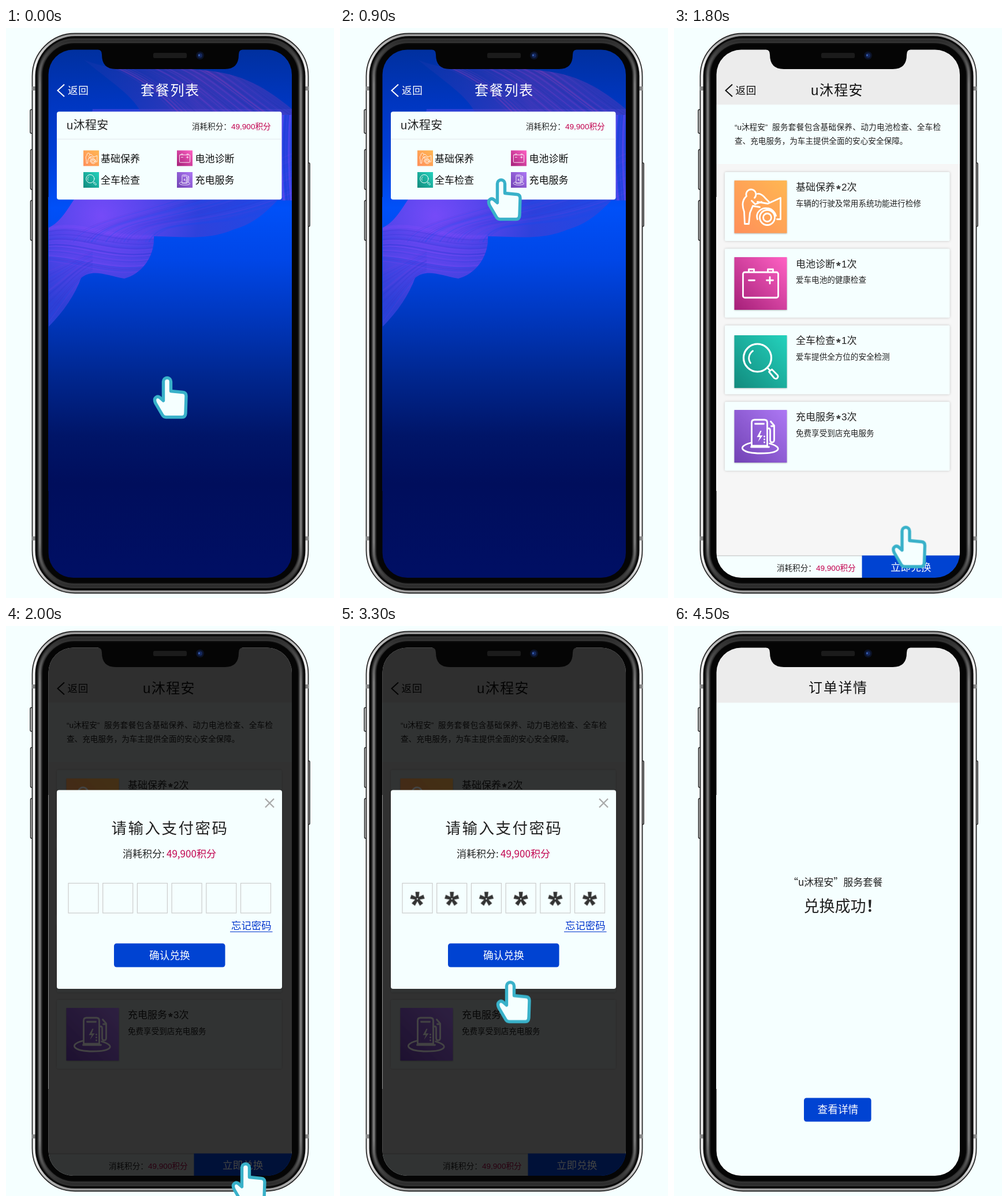
These frames come from a looping animation (568 px wide and 985 px high, 6000 ms). An HTML page:

```html
<!DOCTYPE html>
<html lang="zh-CN">
<head>
<meta charset="utf-8">
<title>套餐兑换</title>
<style>
html,body{margin:0;width:100%;height:100%;overflow:hidden;background:#f5ffff}
svg{display:block;width:568px;height:985px}
text{font-family:'Noto Sans CJK SC','Noto Sans CJK',sans-serif;fill:#222;white-space:pre}
.a{font-family:'Liberation Sans','Noto Sans CJK SC','Noto Sans CJK',sans-serif}
.w{fill:#fff}.k{fill:#111}.r{fill:#c2004e}.b{fill:#0034cc}
.s13{font-size:13.55px}.s17{font-size:17px}
.h{font-size:24px;letter-spacing:1.4px}
.back{font-size:17.5px;letter-spacing:.7px}
.paper{fill:#f5ffff}.blue{fill:#0043d2}
.line{fill:none;stroke:#fff;stroke-width:2.8;stroke-linecap:round;stroke-linejoin:round}
.box{fill:none;stroke:#ccc;stroke-width:1.2}
.pick{fill:none;stroke:#dcdfe4;stroke-width:1.2}
.card{fill:#f5ffff;filter:drop-shadow(0 0 2px #0003)}
.x{fill:none;stroke:#a8a8a8;stroke-width:2.2}
#list,#detail,#ask,#shop,#dim,#done{animation:6s step-end infinite}
#list{animation-name:list}#detail{animation-name:detail}#dim{animation-name:dim}
#ask{animation-name:ask}#shop{animation-name:shop}#done{animation-name:done}
@keyframes list{0%{opacity:1}16.66%,100%{opacity:0}}
@keyframes detail{0%{opacity:0}16.66%{opacity:1}74.99%,100%{opacity:0}}
@keyframes dim{0%{opacity:0}33.33%{opacity:1}74.99%,100%{opacity:0}}
@keyframes ask{0%{opacity:0}33.33%{opacity:1}58.33%,100%{opacity:0}}
@keyframes shop{0%{opacity:0}58.33%{opacity:1}74.99%,100%{opacity:0}}
@keyframes done{0%{opacity:0}74.99%,100%{opacity:1}}
.star{animation:star 6s step-end infinite;animation-delay:calc(var(--i)*100ms - 3901ms)}
@keyframes star{0%{opacity:1}40%,100%{opacity:0}}
#hand{animation:hand 6s infinite}
@keyframes hand{
0%{transform:translate(255px,602px);opacity:1;animation-timing-function:steps(9,end)}
14.99%{transform:translate(255px,260px);animation-timing-function:steps(10,end)}
31.66%{transform:translate(391px,927px)}
41.66%{transform:translate(391px,927px);animation-timing-function:steps(9,end)}
56.66%{transform:translate(256px,574px)}
58.33%{transform:translate(256px,574px);opacity:1;animation-timing-function:steps(9,end)}
73.33%{transform:translate(283px,610px);opacity:1;animation-timing-function:step-end}
74.99%,100%{transform:translate(283px,610px);opacity:0}
}
</style>
</head>
<body>
<svg viewBox="0 0 568 985">
<defs>
<linearGradient id="sky" x2="0" y2="1">
<stop offset="0" stop-color="#00309f"/><stop offset=".1" stop-color="#0036c0"/><stop offset=".2" stop-color="#003ed6"/>
<stop offset=".3" stop-color="#0050f8"/><stop offset=".4" stop-color="#0046e6"/><stop offset=".5" stop-color="#0038c0"/>
<stop offset=".62" stop-color="#00268e"/><stop offset=".73" stop-color="#001568"/><stop offset=".82" stop-color="#000e5c"/><stop offset="1" stop-color="#000f64"/>
</linearGradient>
<radialGradient id="paint" gradientUnits="userSpaceOnUse" cx="165" cy="325" r="280">
<stop offset="0" stop-color="#8a4af8"/><stop offset=".3" stop-color="#6444ea"/><stop offset=".6" stop-color="#3640d8"/><stop offset="1" stop-color="#2846e0"/>
</radialGradient>
<linearGradient id="haze" x2="1"><stop offset="0" stop-color="#2038b0" stop-opacity=".4"/><stop offset=".55" stop-color="#5c38b4"/><stop offset="1" stop-color="#4038b8"/></linearGradient>
<linearGradient id="orange" x1="1" x2="0" y2="1"><stop stop-color="#ffb752"/><stop offset="1" stop-color="#ff8f5a"/></linearGradient>
<linearGradient id="pink" x1="1" x2="0" y2="1"><stop stop-color="#ff62c4"/><stop offset="1" stop-color="#a41f78"/></linearGradient>
<linearGradient id="teal" x1="1" x2="0" y2="1"><stop stop-color="#24d2bd"/><stop offset="1" stop-color="#128a7d"/></linearGradient>
<linearGradient id="violet" x1="1" x2="0" y2="1"><stop stop-color="#ad78f4"/><stop offset="1" stop-color="#7142b4"/></linearGradient>
<linearGradient id="metal" x2="0" y2="1"><stop stop-color="#999"/><stop offset=".06" stop-color="#f4f4f4"/><stop offset=".94" stop-color="#f0f0f0"/><stop offset="1" stop-color="#999"/></linearGradient>
<linearGradient id="rail" x2="0" y2="1"><stop stop-color="#2c2c2c"/><stop offset=".08" stop-color="#777"/><stop offset=".92" stop-color="#777"/><stop offset="1" stop-color="#2c2c2c"/></linearGradient>
<clipPath id="screen"><rect x="73.500" y="37.500" width="421.500" height="912.500" rx="43"/></clipPath>
<clipPath id="swash"><path d="M74 345C95 335 105 315 122 290L150 140H495V298H470C450 318 430 338 395 348C350 368 300 360 256 360C258 395 235 425 205 433C175 428 150 415 130 432C120 460 100 490 74 516Z"/></clipPath>
<clipPath id="smear"><path d="M135 55C200 82 260 62 330 72C400 76 440 95 495 140V150H235C225 120 180 92 135 55Z"/></clipPath>
<g id="repair"><rect width="91" height="91" fill="url(#orange)"/>
<path class="line" d="M21 27a8.500 8.500 0 1 1 14 3M20 28C12 36 14 46 17 54L18 75H25L27 56L32 44L44 46M30 35L36 41L47 37M40 23C45 22 50 26 54 31L60 37M40 37L58 40L80 30V67H74M40 67C36 55 47 47 56 48C64 48 70 54 72 61"/>
<circle class="line" cx="57" cy="64" r="13"/><circle class="line" cx="57" cy="64" r="7"/></g>
<g id="battery"><rect width="91" height="91" fill="url(#pink)"/>
<rect class="line" x="15" y="26" width="61" height="44" rx="3"/>
<path class="line" d="M25 25V21H34V25M58 25V21H67V25M25 40H35M56 40H67M61.500 34.500V45.500"/></g>
<g id="search"><rect width="91" height="91" fill="url(#teal)"/>
<circle class="line" cx="40" cy="39" r="24" style="stroke-width:3.2"/><path class="line" d="M28 48C23 41 25 32 32 27M58 57L62 61M60 63L65 59L75 69C77 73 73 77 69 74Z"/></g>
<g id="charge"><rect width="91" height="91" fill="url(#violet)"/>
<path class="line" d="M30 62V22Q30 17 35 17H52Q57 17 57 22V62ZM36 24H51M57 32H60Q62 32 62 36V52Q62 56 65 56Q69 56 69 52V27L63 20M64 28H69M28 57C2 64 14 75 46 75C78 75 86 65 61 58M29 64H60"/>
<path d="M45 36L39 47H44L41 55L49 44H44L47 36Z" fill="#fff"/><path class="line" d="M52 46V58" stroke-dasharray="0 5"/></g>
<path id="ast" d="M-2-1L-3.200-11H3.200L2-1Z"/>
<g id="mark"><use href="#ast"/><use href="#ast" transform="rotate(72)"/><use href="#ast" transform="rotate(144)"/><use href="#ast" transform="rotate(216)"/><use href="#ast" transform="rotate(288)"/></g>
<path id="chev" d="M101 97.500L89.500 108L101 118.500" fill="none" stroke-width="2"/>
<path id="down" d="M431 353L438.500 360.500L446 353" fill="none" stroke="#aaa" stroke-width="1.4"/>
<path id="cross" class="x" d="M449 298.500L464 313.500M464 298.500L449 313.500"/>
</defs>

<!-- phone body -->
<g fill="#d8d8d8" stroke="#222" stroke-width="1.500">
<rect x="42" y="141" width="7" height="41" rx="2"/><rect x="42.500" y="210" width="7" height="69" rx="2"/><rect x="42.500" y="298" width="7" height="69" rx="2"/><rect x="519" y="233" width="7" height="110" rx="2"/>
</g>
<rect x="45.500" y="9.500" width="478" height="967" rx="74" fill="url(#metal)" stroke="#2a2a2a" stroke-width="1.800"/>
<path d="M45 104.500H51M518 104.500H524M45 882H51M518 882H524" stroke="#888" stroke-width="7"/>
<rect x="50.500" y="14" width="468" height="958" rx="69" fill="#0c0c0c"/>
<rect x="58.500" y="22" width="452" height="942" rx="60" fill="none" stroke="#333" stroke-width="8"/>
<rect x="58.500" y="22" width="452" height="942" rx="60" fill="none" stroke="url(#rail)" stroke-width="4"/>
<rect x="64" y="28" width="441" height="930" rx="53" fill="#050505"/>

<g clip-path="url(#screen)">
<g id="list">
<rect x="73" y="37" width="423" height="914" fill="url(#sky)"/>
<g clip-path="url(#swash)" fill="none"><rect x="73" y="130" width="423" height="400" fill="url(#paint)" opacity=".85"/><g id="strokes"></g></g>
<g clip-path="url(#smear)" fill="none"><rect x="130" y="50" width="366" height="100" fill="url(#haze)" opacity=".6"/><g id="streaks"></g></g>
<use href="#chev" stroke="#fff"/><text class="w back" x="107" y="114">返回</text>
<text class="w h" x="233" y="116" style="letter-spacing:1.7px">套餐列表</text>
<rect class="paper" x="88" y="144.500" width="389.500" height="152" rx="4"/>
<path d="M88 192H477.500" stroke="#e2e6ec"/>
<text class="a" x="105" y="175" font-size="20" letter-spacing=".4">u沐程安</text>
<text class="a s13" x="322" y="175">消耗积分：</text><text class="a s13 r" x="390" y="175">49,900积分</text>
<use href="#repair" transform="translate(134 211.500)scale(.297)"/><use href="#battery" transform="translate(296 211.500)scale(.297)"/>
<use href="#search" transform="translate(134 249)scale(.297)"/><use href="#charge" transform="translate(296 249)scale(.297)"/>
<g class="s17"><text class="k" x="164" y="232">基础保养</text><text class="k" x="327.500" y="232">电池诊断</text><text class="k" x="164" y="269">全车检查</text><text class="k" x="327.500" y="269">充电服务</text></g>
</g>

<g id="detail">
<rect x="73" y="37" width="423" height="914" fill="#f6f6f6"/>
<rect x="73" y="37" width="423" height="95.500" fill="#ececec"/><rect class="paper" x="73" y="132.500" width="423" height="102.500"/>
<use href="#chev" stroke="#111"/><text class="k back" x="106.500" y="113.500">返回</text>
<text class="a k h" x="237" y="115.500">u沐程安</text>
<text class="a s13" x="105" y="176">“u沐程安”</text><text class="s13" x="170" y="176" letter-spacing=".38">服务套餐包含基础保养、动力电池检查、全车检</text>
<text class="s13" x="105" y="200" letter-spacing=".06">查、充电服务，为车主提供全面的安心安全保障。</text>
<g id="cards"></g>
<rect class="paper" x="73" y="912" width="253" height="39"/><path d="M73 912H326" stroke="#bbb"/>
<text class="a s13" x="178" y="938">消耗积分：</text><text class="a s13 r" x="246" y="938">49,900积分</text>
<g id="buy"><rect class="blue" x="325.500" y="911.500" width="170" height="39"/><text class="w" x="375" y="938" font-size="17.600">立即兑换</text></g>
</g>

<g id="dim">
<rect x="73" y="37" width="423" height="914" opacity=".8"/>
<g opacity=".08"><use href="#repair" x="104.500" y="263.500"/><use href="#charge" x="104.500" y="660"/><use href="#buy"/></g>
</g>

<g id="ask">
<rect class="paper" x="88" y="283.500" width="390" height="343.500" rx="4"/><use href="#cross"/>
<text x="182.500" y="359" font-size="26.500" letter-spacing="2.500">请输入支付密码</text>
<text class="s17" x="202" y="399.500">消耗积分:</text><text class="s17 r" x="278" y="399.500">49,900积分</text>
<g id="cells"></g>
<text class="b" x="390" y="524" font-size="17.400">忘记密码</text><path d="M388 528.500H461.500" stroke="#0034cc"/>
<rect class="blue" x="187" y="548.500" width="192.500" height="41" rx="4.500"/><text class="w" x="248" y="575.500" font-size="17.700">确认兑换</text>
</g>

<g id="shop">
<rect class="paper" x="88" y="284" width="390" height="343.500" rx="4"/><use href="#cross"/>
<g font-size="16.700"><text x="108" y="363.500">省</text><text x="154" y="363.500">份</text><text x="108" y="425.500">城</text><text x="154" y="425.500">市</text><text x="108" y="487.500">特</text><text x="131" y="487.500">约</text><text x="153.500" y="487.500">店</text>
<text x="198" y="363.500">某某省</text><text x="198" y="425.500">某某市</text><text x="198" y="487.500">某某特约店</text></g>
<rect class="pick" x="186.500" y="336.500" width="271.500" height="39.500"/><rect class="pick" x="186.500" y="399" width="271.500" height="39"/><rect class="pick" x="186.500" y="461" width="271.500" height="39"/>
<use href="#down"/><use href="#down" y="62"/><use href="#down" y="124.500"/>
<text class="b" x="362" y="521" font-size="13.900">请选择省份信息</text>
<rect class="blue" x="187" y="542" width="192.500" height="41" rx="4.500"/><text class="w" x="266" y="569" font-size="17.300">确定</text>
<text class="a s13" x="137.500" y="608.500">“u沐程安”</text><text x="202" y="608.500" font-size="13.850">服务套餐只能在选定的特约店核销使用</text>
</g>

<g id="done">
<rect class="paper" x="73" y="37" width="423" height="914"/><rect x="73" y="37" width="423" height="95.500" fill="#ececec"/>
<text class="k h" x="233" y="115" style="letter-spacing:1.7px">订单详情</text>
<text class="s17" x="198" y="449">“u沐程安”服务套餐</text>
<text x="224.500" y="493.500" font-size="27">兑换成功<tspan font-weight="700">！</tspan></text>
<rect class="blue" x="225" y="815.500" width="116.500" height="41" rx="4.500"/><text class="w" x="248.500" y="842" font-size="17.700">查看详情</text>
</g>
</g>

<path d="M160 36V37.500Q166 38 166 46Q166 71 190 71H379Q403 71 403 46Q403 38 409 37.500V36Z" fill="#050505"/>
<rect x="255" y="43" width="58" height="9" rx="2.500" fill="#1b1b1b"/>
<circle cx="336" cy="47.500" r="7" fill="#0b1226"/><circle cx="336" cy="47.500" r="4" fill="#14275c"/><circle cx="334.500" cy="47" r="1.500" fill="#3e66b8"/>

<g id="hand"><path d="M17.500 42V9A6.500 6.500 0 0 1 30.500 9V25.500L51 27.500Q57 28 57 34L56 64Q55.500 70.500 50 70.500H22Q18 70.500 16 67L4 46.500Q.500 39 5 36Q9 33.500 13 38Z" fill="#f5ffff" stroke="#39b1c9" stroke-width="5.400" stroke-linejoin="round"/></g>
</svg>
<script>
const $ = id => document.getElementById(id);

const items = [
  [249, 263.5, 'repair', '基础保养', 2, '车辆的行驶及常用系统功能进行检修'],
  [381.5, 396, 'battery', '电池诊断', 1, '爱车电池的健康检查'],
  [514, 531, 'search', '全车检查', 1, '爱车提供全方位的安全检测'],
  [646, 660, 'charge', '充电服务', 3, '免费享受到店充电服务']
];
$('cards').innerHTML = items.map(([y, top, icon, name, n, note]) => `
  <rect class="card" x="88" y="${y}" width="389.5" height="119" rx="2"/>
  <use href="#${icon}" x="104.5" y="${top}" style="filter:drop-shadow(0 1px 1px #0004)"/>
  <text class="s17" x="211" y="${y + 32}">${name}</text>
  <use href="#mark" transform="translate(284.800 ${y + 26.5})scale(.33)" fill="#222"/>
  <text class="a s17" x="290" y="${y + 32}">${n}次</text>
  <text class="s13" x="211" y="${y + 58.5}">${note}</text>`).join('');

$('cells').innerHTML = [0, 1, 2, 3, 4, 5].map(i => `
  <rect class="box" x="${108 + i * 59.7}" y="444.5" width="52" height="51.5"/>
  <g class="star" style="--i:${i}"><use href="#mark" transform="translate(${134 + i * 59.7} 471.500)scale(1.100)" fill="#333"/></g>`).join('');

// brush marks in the painted backdrop
let seed = 7;
const rnd = () => (seed = seed * 16807 % 2147483647) / 2147483647;
const mark = (d, colors) => `<path d="${d}" stroke="${colors[rnd() * colors.length | 0]}" stroke-width="${(0.8 + rnd() * 2).toFixed(1)}" opacity="${(0.1 + rnd() * 0.25).toFixed(2)}"/>`;
const many = (n, draw) => Array.from({length: n}, (_, i) => draw(i / n)).join('');
const violet = ['#9a4cff', '#7444f0', '#2a34d0', '#2346e0'];
const dusk = ['#5a40e0', '#2a34d0', '#1c48e8'];
const plum = ['#a03cb8', '#7a3cc8', '#1c30a8', '#2434b4'];
$('strokes').innerHTML =
  many(26, k => mark(`M74 ${345 + 60 * k}C130 ${330 + 80 * k} 180 ${365 + 70 * k} 256 ${358 + 62 * k}`, violet)) +
  many(24, k => mark(`M${110 + 150 * k} 370C${150 + 130 * k} 320 ${250 + 120 * k} ${330 + 30 * k} 500 ${215 + 90 * k}`, dusk)) +
  many(14, k => mark(`M74 ${420 + 95 * k}C100 ${410 + 70 * k} 120 ${400 + 40 * k} 150 ${385 + 40 * k}`, dusk)) +
  many(12, k => mark(`M${478 + 17 * k} 150Q${470 + 20 * k} 220 ${480 + 17 * k} 300`, violet));
$('streaks').innerHTML = many(30, k =>
  mark(`M${140 + 250 * k} ${52 + 15 * k}C${210 + 220 * k} 75 ${250 + 190 * k} 100 ${300 + 230 * k} 155`, plum));
</script>
</body>
</html>
```
